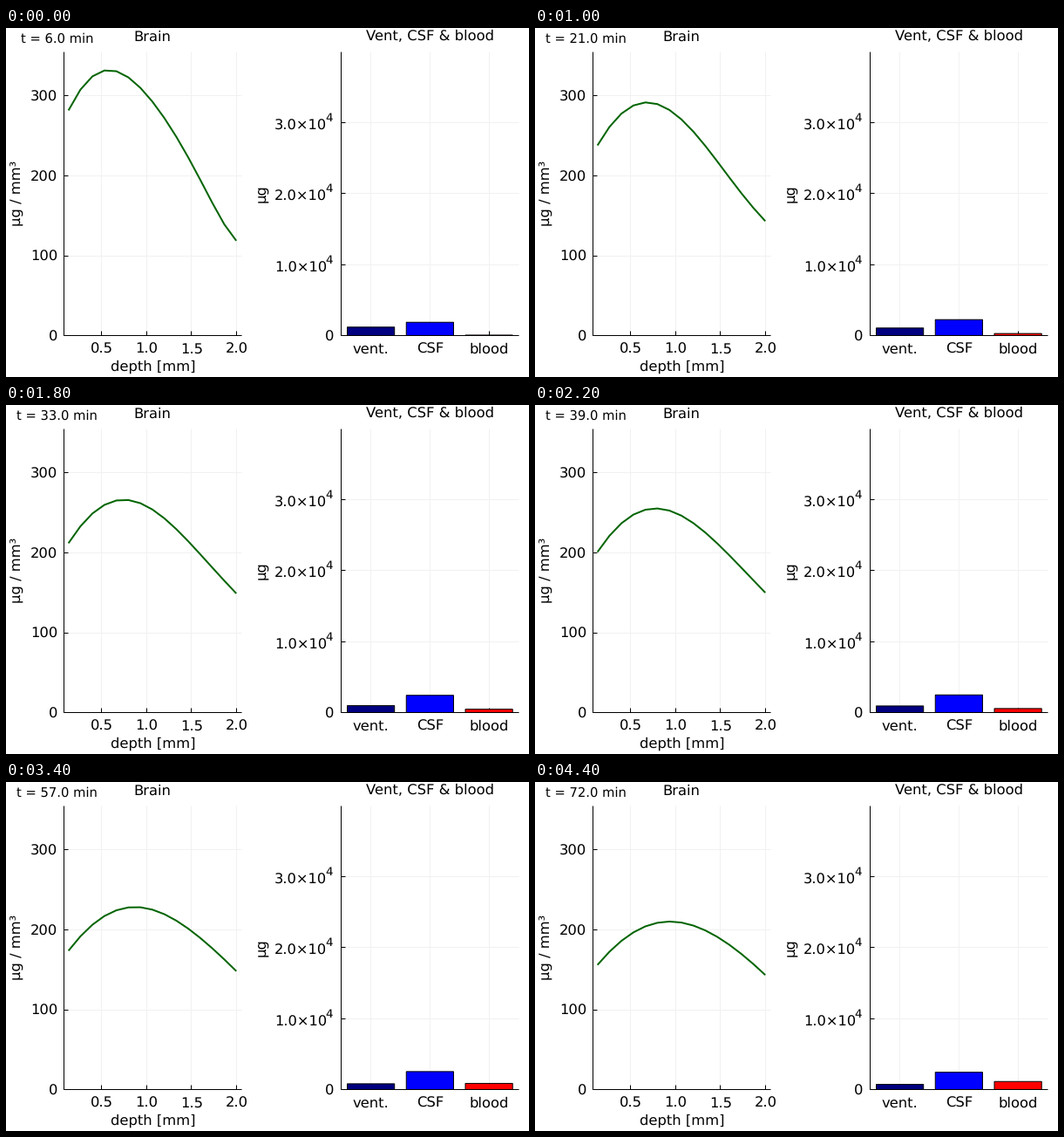
Write a matplotlib script that moves like this. It is 600 by 400 pixels and loops after 4.6 s.

```python
import math
import numpy as np
import matplotlib.pyplot as plt
from matplotlib.animation import FuncAnimation
from matplotlib.patches import Rectangle

W, H, DPI = 600, 400, 100
FRAMES, STEP_MS = 23, 200
START, MINUTES = 6, 3
PX = 72 / DPI
TOP, BASE = 27.5, 352.5
GRID = "#f1f1f1"

# Brain tissue: diffusion between cells, loss at both ends (per minute)
CELLS = 15
DIFFUSION, LOSS_IN, LOSS_OUT = 0.405, 0.0495, 0.0415
SUBSTEPS = 30

plt.rcParams["font.family"] = "DejaVu Sans"
plt.rcParams["text.hinting"] = "none"


def depth_x(d):
    return 57.9 + 103.15 * d


def brain_y(c):
    return 352.9 - 0.9165 * c


def amount_y(a):
    return BASE - 81.45e-4 * a


def crisp(v):
    return math.floor(v) + 0.5


def first_profile():
    keys = [0, 1, 4, 7, 10, 13, 14]
    conc = [282, 308, 331, 293, 223, 139.5, 119]
    shape = np.polyfit((np.array(keys) - 7) / 7, conc, 6)
    return np.polyval(shape, np.linspace(-1, 1, CELLS))


def frame_step():
    rate = np.zeros((CELLS, CELLS))
    for a in range(CELLS - 1):
        b = a + 1
        rate[a, a] -= DIFFUSION
        rate[b, b] -= DIFFUSION
        rate[a, b] += DIFFUSION
        rate[b, a] += DIFFUSION
    rate[0, 0] -= LOSS_IN
    rate[-1, -1] -= LOSS_OUT
    small = np.eye(CELLS) + rate * MINUTES / SUBSTEPS
    return np.linalg.matrix_power(small, SUBSTEPS)


def amounts(t):
    s, d = t - START, t - 52.5
    ventricle = 1190 * math.exp(-0.0075 * s)
    csf = 2535 - 0.27 * d**2 + 0.0008 * d**3
    blood = 65 + 14.2 * s + 0.03 * s**2
    return ventricle, csf, blood


fig = plt.figure(figsize=(W / DPI, H / DPI), dpi=DPI, facecolor="white")
ax = fig.add_axes([0, 0, 1, 1])
ax.set_xlim(0, W)
ax.set_ylim(H, 0)
ax.axis("off")


def line(x0, y0, x1, y1, color="black", z=2):
    ax.plot([x0, x1], [y0, y1], color=color, lw=PX, zorder=z,
            solid_capstyle="butt", snap=False)


def label(x, y, text, size=16.4, ha="center", **kw):
    return ax.text(x, y, text, fontsize=size * PX, ha=ha, va="baseline",
                   color="black", **kw)


def side_label(x, text):
    label(x, 189.2, text, rotation=90, rotation_mode="anchor")


def panel(x0, x1, xticks, yticks):
    for x in map(crisp, xticks):
        line(x, TOP, x, BASE, GRID, 1)
        line(x, BASE, x, BASE - 5)
    for y in map(crisp, yticks):
        line(x0, y, x1, y, GRID, 1)
        line(x0, y, x0 + 5, y)
    line(x0, TOP, x0, BASE + 0.5)
    line(x0, BASE, x1, BASE)


# Left panel
depths = [0.5, 1.0, 1.5, 2.0]
levels = [0, 100, 200, 300]
panel(66.5, 270.5, [depth_x(d) for d in depths], [brain_y(c) for c in levels])
for d in depths:
    label(depth_x(d) + 0.2, 372.3, f"{d:.1f}")
for c in levels:
    label(59, brain_y(c) + 5.8, str(c), ha="right")
label(168, 14.3, "Brain")
label(168.5, 392.7, "depth [mm]")
side_label(17.2, "µg / mm³")

# Right panel
centers = [418.6 + 67.75 * k for k in range(3)]
panel(384.5, 588.5, centers, [amount_y(k * 1e4) for k in range(4)])
for x, name in zip(centers, ["vent.", "CSF", "blood"]):
    label(x, 372.3, name)
label(376.6, BASE + 6, "0", ha="right")
for k in (1, 2, 3):
    y = amount_y(k * 1e4)
    label(368.3, y + 8.5, f"{k}.0×10", size=16.2, ha="right")
    label(366.8, y - 1.2, "4", size=13.4, ha="left")
label(487, 14.3, "Vent, CSF & blood")
side_label(298.5, "µg")

clock = label(58.9, 17, "", size=14.8)
curve, = ax.plot([], [], color="#006400", lw=2 * PX, zorder=4,
                 solid_joinstyle="round", solid_capstyle="butt")
bars = []
for x, color in zip(centers, ["#000080", "#0000ff", "#ff0000"]):
    bar = Rectangle((x - 27.1, BASE), 54.2, 0, facecolor=color,
                    edgecolor="black", lw=PX, zorder=3, snap=False)
    bars.append(ax.add_patch(bar))

cell_x = depth_x(np.arange(1, CELLS + 1) * 2 / CELLS)
profile, step = first_profile(), frame_step()


def update(i):
    t = START + MINUTES * i
    clock.set_text(f"t = {t:.1f} min")
    conc = np.linalg.matrix_power(step, i) @ profile
    curve.set_data(cell_x, brain_y(conc))
    for bar, amount in zip(bars, amounts(t)):
        bar.set_height(amount_y(amount) - BASE)
    return [clock, curve, *bars]


anim = FuncAnimation(fig, update, frames=FRAMES, interval=STEP_MS,
                     repeat=True, repeat_delay=0)
plt.show()
```
